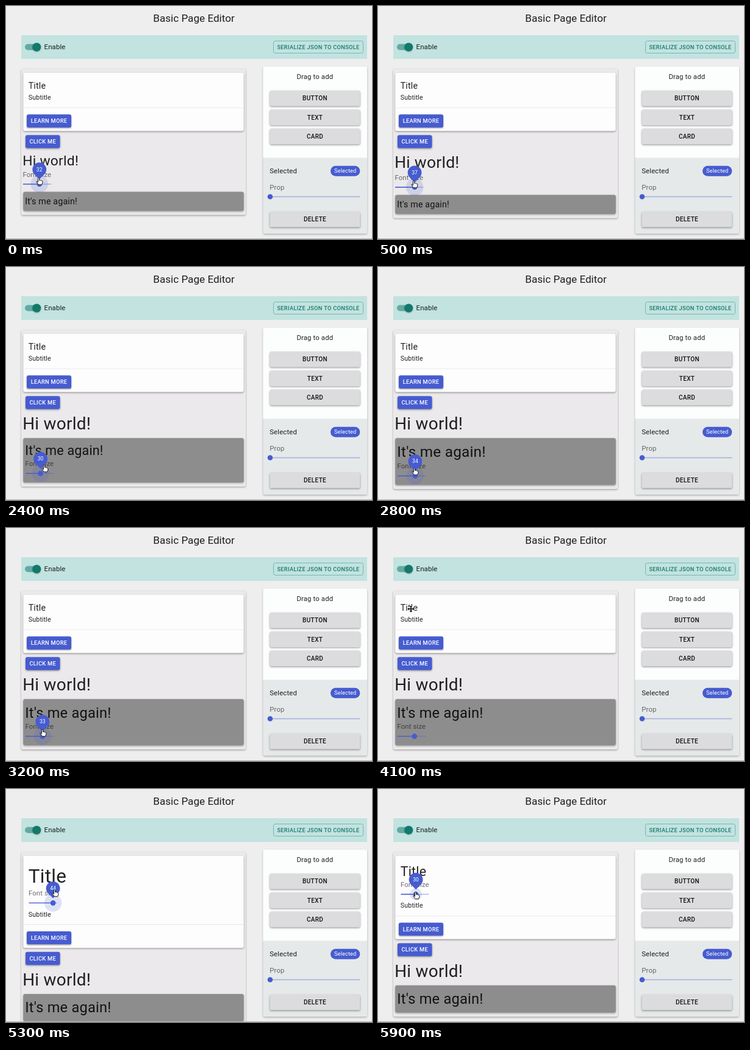
An HTML page with a canvas for the animation above (6000 ms loop, 600x383 px).

```html
<!DOCTYPE html>
<html lang="en">
<head>
<meta charset="utf-8">
<title>Basic Page Editor</title>
<style>
html, body { margin: 0; width: 100%; height: 100%; overflow: hidden; background: #efeeef; }
canvas { display: block; }
</style>
</head>
<body>
<canvas id="stage" width="600" height="383"></canvas>
<script>
const ctx = document.getElementById('stage').getContext('2d');
const LOOP = 6000, STEP = 100;
const UNIT = 0.7143;            // page zoom
const LINE = 1.43 * UNIT;       // line height per font-size unit
const SLIDER_H = 31.2;
const BLUE = '#465cd0', INK = 'rgba(0,0,0,.87)', MUTED = 'rgba(0,0,0,.56)';

// Keyframes: [time, value...]
const hiSize = [[0, 32], [700, 39]];
const againSize = [[2000, 20], [2100, 21], [2400, 30], [2500, 37], [2600, 36], [2800, 34], [2900, 33]];
const titleSize = [[4600, 20], [4800, 18], [4900, 18], [5000, 20], [5300, 44], [5400, 47], [5500, 45], [5600, 40], [5700, 36], [5900, 30]];
const pointer = [
  [0, 55, 288], [700, 62, 295], [1100, 63, 298], [1400, 64, 323], [1600, 64, 323],
  [1900, 46, 332], [2100, 49, 331], [2400, 64, 331], [2500, 64, 332], [2800, 61, 336], [3500, 61, 337],
  [4100, 54, 133], [4400, 52, 133], [4600, 52, 166], [4800, 50, 171], [5000, 54, 171],
  [5300, 81, 171], [5400, 80, 172], [5900, 63, 175]
];

function track(keys, t) {
  if (t <= keys[0][0]) return keys[0].slice(1);
  for (let i = 1; i < keys.length; i++) {
    const a = keys[i - 1], b = keys[i];
    if (t <= b[0]) {
      const k = (t - a[0]) / (b[0] - a[0]);
      return a.slice(1).map((v, j) => v + (b[j + 1] - v) * k);
    }
  }
  return keys[keys.length - 1].slice(1);
}
const sizeAt = (keys, t) => Math.round(track(keys, t)[0]);
const within = (t, from, to) => t >= from && t < to;

function box(x, y, w, h, fill, radius = 0, shadow = 0) {
  ctx.save();
  if (shadow) {
    ctx.shadowColor = `rgba(0,0,0,${shadow})`;
    ctx.shadowBlur = 3;
    ctx.shadowOffsetY = 1.2;
  }
  ctx.fillStyle = fill;
  ctx.beginPath();
  ctx.roundRect(x, y, w, h, radius);
  ctx.fill();
  ctx.restore();
}

function disc(x, y, r, fill) {
  ctx.fillStyle = fill;
  ctx.beginPath();
  ctx.arc(x, y, r, 0, 7);
  ctx.fill();
}

// Text placed by the vertical centre of its line
function label(str, x, midY, size, { color = INK, weight = 400, align = 'left', gap = 0.01 } = {}) {
  ctx.font = `${weight} ${size}px Roboto, sans-serif`;
  ctx.letterSpacing = `${gap * size}px`;
  ctx.textAlign = align;
  ctx.fillStyle = color;
  ctx.fillText(str, x, midY + 0.342 * size);
}

function button(str, x, y, w, h, fill, color, size) {
  box(x, y, w, h, fill, 2.9, 0.4);
  label(str, x + w / 2, y + h / 2, size, { color, weight: 500, align: 'center', gap: 0.032 });
}

function rail(x, y, w, filled) {
  ctx.globalAlpha = 0.42;
  box(x, y - 0.7, w, 1.4, BLUE);
  ctx.globalAlpha = 1;
  box(x, y - 0.7, filled, 1.4, BLUE);
}

function fontSlider(x, top, value, state) {
  label('Font size', x - 0.6, top + 5.9, 16 * UNIT, { color: MUTED });
  const y = top + 22, offset = (value - 7) * 46 / 43, tx = x + offset;
  rail(x, y, 46, offset);
  if (state.halo) disc(tx, y, state.halo, 'rgba(70,92,208,.17)');
  disc(tx, y, 4.3, BLUE);
  if (!state.bubble) return;
  ctx.save();
  ctx.translate(tx, y - 24);
  ctx.rotate(Math.PI / 4);
  box(-11.4, -11.4, 22.8, 22.8, BLUE, [11.4, 11.4, 0, 11.4]);
  ctx.restore();
  label(value, tx, y - 24, 12 * UNIT, { color: '#fff', align: 'center' });
}

function drawChrome() {
  box(0, 0, 600, 383, '#efeeef');
  label('Basic Page Editor', 308, 19.8, 24 * UNIT, { align: 'center', gap: 0 });

  box(25, 48, 567, 39, '#c2e3e0');
  box(31, 62.5, 26, 10, '#62aaa2', 5);
  ctx.save();
  ctx.shadowColor = 'rgba(0,0,0,.3)';
  ctx.shadowBlur = 2;
  ctx.shadowOffsetY = 1;
  disc(50.3, 67.5, 7, '#12796b');
  ctx.restore();
  label('Enable', 62.6, 67.5, 16 * UNIT);
  ctx.strokeStyle = '#78b6b0';
  ctx.lineWidth = 1;
  ctx.beginPath();
  ctx.roundRect(438.5, 57.5, 147, 20, 2.9);
  ctx.stroke();
  label('SERIALIZE JSON TO CONSOLE', 512, 67.5, 13 * UNIT, { color: '#17796d', weight: 500, align: 'center', gap: 0.032 });

  box(421.5, 99.5, 170.5, 274.8, '#e6e9e9', 2.9, 0.3);
  box(421.5, 99.5, 170.5, 150, '#fbfefd', [2.9, 2.9, 0, 0]);
  label('Drag to add', 506.3, 116, 16 * UNIT, { align: 'center' });
  [['BUTTON', 139], ['TEXT', 170.3], ['CARD', 201.6], ['DELETE', 338]].forEach(([str, y]) =>
    button(str, 432.5, y, 148, 25.6, '#dcdbdd', '#111', 14 * UNIT));
  label('Selected', 432.2, 270.8, 16 * UNIT);
  box(532, 262.8, 48.3, 17, BLUE, 8.5);
  label('Selected', 556.2, 271, 13 * UNIT, { color: '#fff', align: 'center' });
  label('Prop', 432.2, 297.8, 16 * UNIT, { color: MUTED });
  rail(433, 313.5, 147.5, 0);
  disc(433, 313.5, 4.3, BLUE);
}

function drawEditor(t) {
  const selected = t < 1500 ? 'hi' : t < 4400 ? 'again' : 'title';
  const hi = sizeAt(hiSize, t), again = sizeAt(againSize, t), title = sizeAt(titleSize, t);
  const dragging = t < 900 || within(t, 2000, 3400) || within(t, 4700, 5900);
  const lit = t < 1500 || within(t, 1900, 3700) || t >= 4600;
  const state = {
    halo: lit ? (dragging ? 14.3 : 10) : 0,
    bubble: t < 1300 || within(t, 1900, 3600) || t >= 4600
  };
  const extra = name => selected === name ? SLIDER_H : 0;

  const titleTop = 120.4;
  const body = titleTop + title * LINE + extra('title');
  const hiTop = body + 97.2;
  const againTop = hiTop + hi * LINE + extra('hi') + 3.5;
  const againH = 10.7 + again * LINE + extra('again');
  const againText = againTop + 5.35;

  box(25, 103.5, 368, againTop + againH + 7 - 103.5, '#ebe9eb', 2.9, 0.35);
  box(28.3, 109.7, 361.4, body + 64.6 - 109.7, '#fefdfe', 2.9, 0.4);
  box(28.3, body + 25.8, 361.4, 0.8, '#e4e3e5');
  label('Subtitle', 36.8, body + 9.3, 15 * UNIT);
  button('LEARN MORE', 34, body + 37.5, 73, 21.3, BLUE, '#fff', 13 * UNIT);
  button('CLICK ME', 32, body + 71.3, 56.5, 21.3, BLUE, '#fff', 13 * UNIT);
  box(28.3, againTop, 361.4, againH, '#8e8d8e', 2.9, 0.4);

  const texts = [
    ['title', 'Title', 37.5, titleTop, title],
    ['hi', 'Hi world!', 28, hiTop, hi],
    ['again', "It's me again!", 32, againText, again]
  ];
  for (const [name, str, x, top, size] of texts) {
    label(str, x - 0.8, top + size * LINE / 2, size * UNIT);
    if (name === selected) fontSlider(x, top + size * LINE, size, state);
  }
}

function outlined(path) {
  ctx.lineJoin = 'round';
  ctx.lineWidth = 1;
  ctx.fillStyle = '#fff';
  ctx.strokeStyle = '#111';
  ctx.fill(path);
  ctx.stroke(path);
}
const hand = new Path2D(`M-2.6 1.8 V-4.6 Q-2.6 -5.8 -1.5 -5.8 T-.4 -4.6 V-1.4
  Q.6 -2.4 1.5 -1.2 Q2.7 -1.9 3.3 -.6 Q4.8 -.9 4.9 .7 V2.4 L3.6 5.8 H-1.6 L-5 1.4
  Q-5.3 -.2 -3.9 .3 Z`);
const arrowHead = new Path2D('M-.8 -1 H.8 V-3 H2.5 L0 -5.8 L-2.5 -3 H-.8 Z');

function drawPointer(t) {
  const [x, y] = track(pointer, t);
  ctx.save();
  ctx.translate(x, y);
  if (t < 1300 || within(t, 1800, 3600) || t >= 4500) {
    outlined(hand);
  } else {
    ctx.strokeStyle = '#fff';
    ctx.fillStyle = '#111';
    ctx.lineWidth = 1.4;
    for (const paint of ['stroke', 'fill']) {
      for (let i = 0; i < 4; i++) {
        ctx[paint](arrowHead);
        ctx.rotate(Math.PI / 2);
      }
    }
    ctx.fillRect(-1, -1, 2, 2);
  }
  ctx.restore();
}

const start = performance.now();
function frame() {
  const elapsed = (performance.now() - start) % LOOP;
  const t = Math.floor(elapsed / STEP) * STEP;
  drawChrome();
  drawEditor(t);
  box(0, 382, 600, 1, '#b4b3b4');
  drawPointer(t);
  requestAnimationFrame(frame);
}
frame();
</script>
</body>
</html>
```
